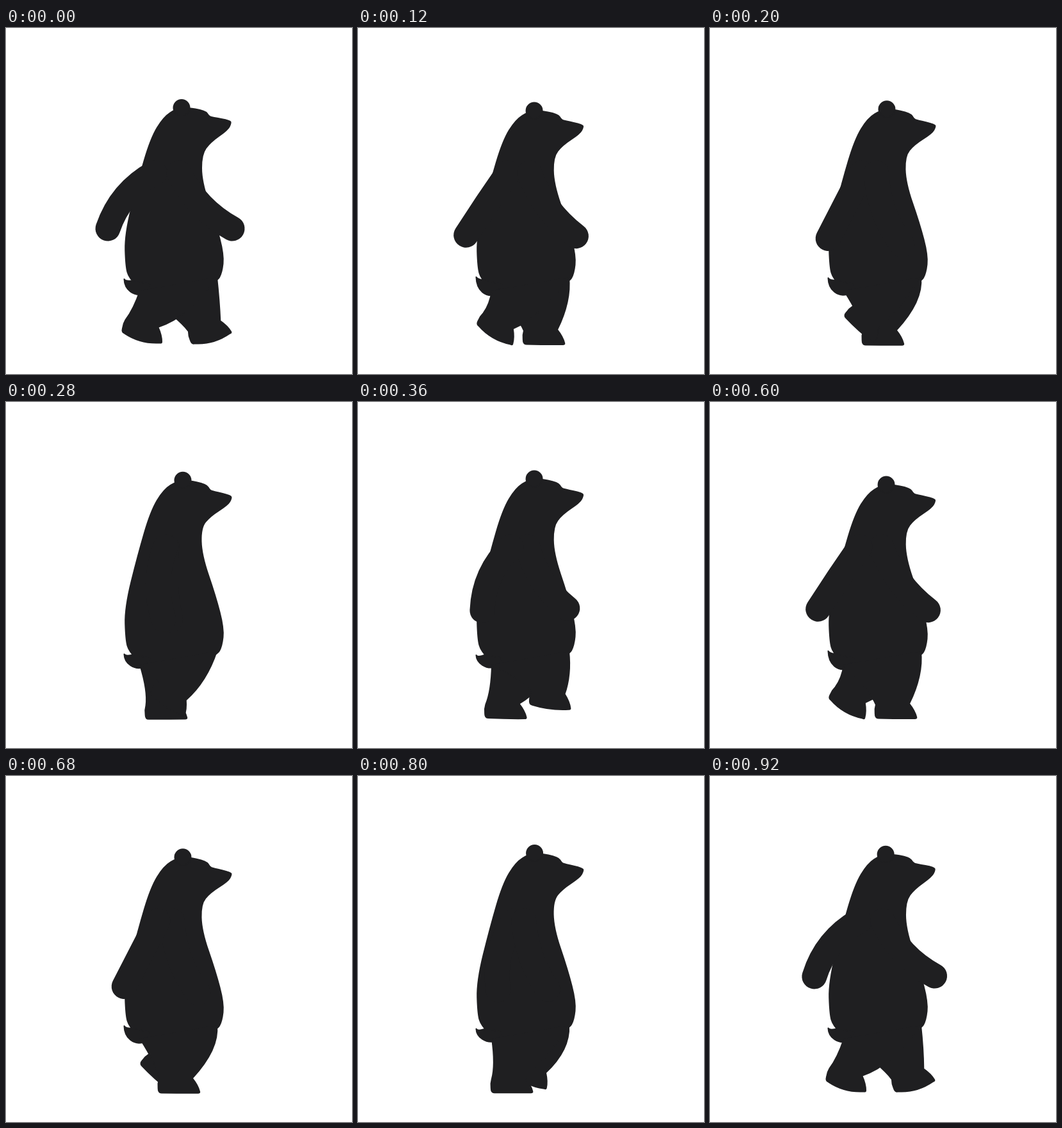
Write an HTML page with a canvas that moves like this. It is 540x540 px and loops after 960 ms.

```html
<!DOCTYPE html>
<html lang="en">
<head>
<meta charset="utf-8">
<title>Walking bear</title>
<style>
  html, body { margin: 0; width: 100%; height: 100%; overflow: hidden; background: #fff; }
  canvas { display: block; }
</style>
</head>
<body>
<canvas id="stage" width="540" height="540"></canvas>
<script>
const ctx = document.getElementById('stage').getContext('2d');
const LOOP = 960, STEP = LOOP / 2, TICK = 40, GROUND = 495, TAU = 2 * Math.PI;

// Control points of head and trunk, clockwise from the ear
const TRUNK = [
  [280, 124], [311, 129], [317, 138], [322, 139.5], [350, 144.5], [351, 149], [346, 159],
  [319, 178], [305, 197], [305, 240], [327, 304], [340, 354], [337, 382], [329, 396],
  [262, 428], [215, 413], [192, 390], [187, 372], [185.5, 322], [206, 240],
  [226, 172], [246, 139], [266, 126]
];

// time, swing (1 is fully back), bow of the elbow
const ARM = [
  [0, 1, 22], [120, 0.9, 1], [200, 0.74, 0], [360, -0.73, 19], [480, -1, 19],
  [600, -0.87, 18], [680, -0.45, 18], [840, 0.64, 22], [920, 0.96, 22]
];

// time, heel x y, foot angle
const FOOT = [
  [0, 289, 495, -16], [60, 272, 494, -1], [360, 197, 494, 1], [440, 179, 477, 15],
  [480, 179, 476, 15], [600, 183, 463, 30], [680, 207, 449, 42], [800, 234, 460, 27],
  [840, 266, 473, 7], [920, 288, 495, -16]
];

const clamp = v => Math.max(0, Math.min(1, v));
const mix = (a, b, u) => a + (b - a) * u;
const bounce = time => 4.7 * Math.sin(TAU * time / STEP);
const curve = (control, end) => ctx.quadraticCurveTo(...control, ...end);

// Smooth cyclic interpolation of key rows
function pose(keys, time) {
  const t = time % LOOP, n = keys.length;
  const i = keys.findLastIndex(k => k[0] <= t);
  const key = j => keys[(j + n) % n];
  const when = j => key(j)[0] + Math.floor(j / n) * LOOP;
  const span = when(i + 1) - when(i), u = (t - when(i)) / span;
  const slope = (j, c) => (key(j + 1)[c] - key(j - 1)[c]) / (when(j + 1) - when(j - 1)) * span;
  return keys[0].slice(1).map((_, k) => {
    const c = k + 1;
    return mix(key(i)[c], key(i + 1)[c], u * u * (3 - 2 * u))
      + slope(i, c) * u * (1 - u) ** 2 - slope(i + 1, c) * u * u * (1 - u);
  });
}

// Fills the current path with a thin rounded rim
function paint() {
  ctx.lineWidth = 2;
  ctx.fill();
  ctx.stroke();
}

function drawTrunk(time) {
  const drop = bounce(time);
  const nod = 0.026 * (1 - Math.cos(TAU * time / STEP));
  const place = ([x, y]) => {
    const a = nod * clamp((x - 240) / 30) * clamp((230 - y) / 50);
    const nx = x - (y - 165) * a, ny = y + (x - 275) * a;
    return [nx, ny + drop * (GROUND - ny) / 384];
  };
  const pts = TRUNK.map(place);
  const middle = i => {
    const p = pts[i % pts.length], q = pts[(i + 1) % pts.length];
    return [mix(p[0], q[0], 0.5), mix(p[1], q[1], 0.5)];
  };
  ctx.beginPath();
  ctx.moveTo(...middle(pts.length - 1));
  pts.forEach((p, i) => curve(p, middle(i)));
  paint();

  ctx.beginPath();
  ctx.arc(...place([274, 124.5]), 12.5, 0, TAU);
  paint();

  const tip = 392 - drop * 0.7, base = 417 + drop * 0.3;
  ctx.beginPath();
  ctx.moveTo(184.5, tip);
  curve([187, tip + 4], [200, 394]);
  ctx.lineTo(225, 400);
  ctx.lineTo(214, base - 2);
  ctx.bezierCurveTo(200, base + 2, 185, base - 8, 184.5, tip);
  paint();
}

function drawArm(time) {
  const [swing, bow] = pose(ARM, time);
  const x = 256 - 97 * swing, y = 342 - 29 * swing ** 2 + bounce(time);
  const sx = 251 - 19 * swing, sy = 226;
  const length = Math.hypot(x - sx, y - sy);
  ctx.lineWidth = 39;
  ctx.beginPath();
  ctx.moveTo(sx, sy);
  curve([(sx + x) / 2 - bow * (y - sy) / length, (sy + y) / 2 + bow * (x - sx) / length], [x, y]);
  ctx.stroke();
}

function drawLeg(time) {
  const [x, y, angle] = pose(FOOT, time);
  const c = Math.cos(angle * TAU / 360), s = Math.sin(angle * TAU / 360);
  const foot = (px, py) => [x + px * c - py * s, y + px * s + py * c];
  const sole = 11 * Math.sin(Math.min(Math.abs(angle), 45) * TAU / 90);
  const forward = clamp((x - 205) / 30);
  const heel = foot(2, -22);
  ctx.beginPath();
  ctx.moveTo(329, 389);
  curve([mix(285, 333, forward), mix(452, 426, forward)], foot(54, -24));
  curve(foot(63, -13), foot(65.5, -3));
  curve(foot(66, -1), foot(63, -1));
  curve(foot(34, sole - 1), foot(6, -1));
  curve(foot(1, -1), foot(1, -8));
  curve(foot(0, -15), heel);
  curve([mix(209, heel[0], 0.7) + 6, mix(410, heel[1], 0.7) - 3], [209, 410]);
  paint();
}

function draw(now) {
  const time = Math.floor(now % LOOP / TICK) * TICK;
  ctx.fillStyle = '#fff';
  ctx.fillRect(0, 0, 540, 540);
  ctx.fillStyle = ctx.strokeStyle = '#1f1f21';
  ctx.lineCap = ctx.lineJoin = 'round';
  drawTrunk(time);
  for (const t of [time, time + STEP]) {
    drawArm(t);
    drawLeg(t);
  }
}

const start = performance.now();
function frame() {
  draw(performance.now() - start);
  requestAnimationFrame(frame);
}
frame();
</script>
</body>
</html>
```
